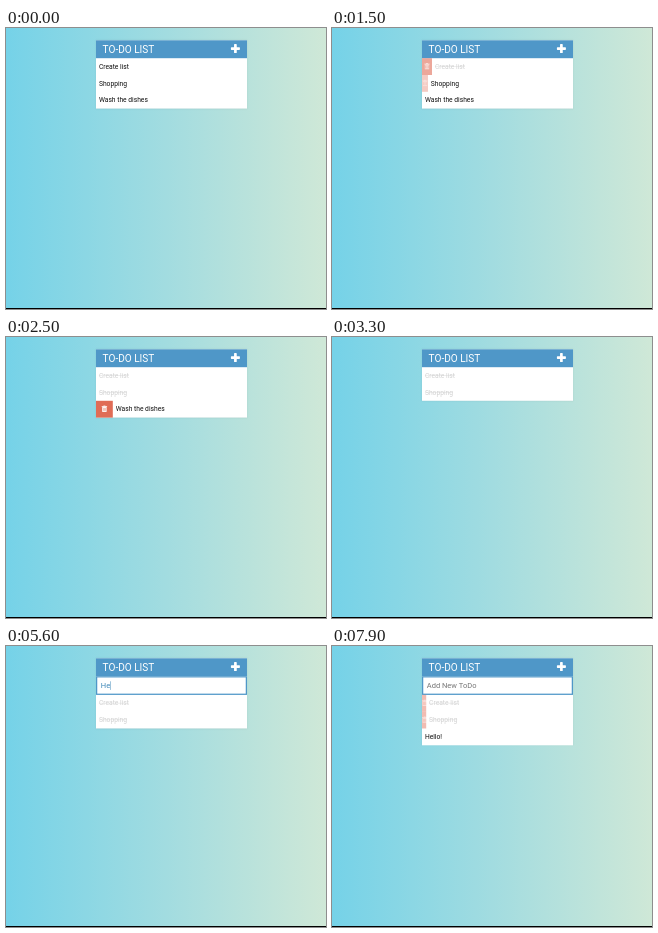
An HTML page with a canvas that plays this animation: 320x281 px, repeating every 8 s.

```html
<!DOCTYPE html>
<html lang="en">
<head>
<meta charset="utf-8">
<title>To-do list</title>
<style>
  html, body { margin: 0; width: 100%; height: 100%; overflow: hidden; background: #a2dce0; }
  canvas { display: block; width: 320px; height: 281px; }
</style>
</head>
<body>
<canvas id="stage"></canvas>
<script>
const W = 320, H = 281, LOOP = 8000;
const LEFT = 90, WIDTH = 151, TOP = 12.3, LIST_TOP = 30.2;
const ROW = 16.8, INPUT_H = 18.7;
const BLUE = '#4f97c8', RED = '#e06c56', BLACK = '#111', DONE = 210;

const canvas = document.getElementById('stage');
const ctx = canvas.getContext('2d');
const dpr = window.devicePixelRatio || 1;
canvas.width = W * dpr;
canvas.height = H * dpr;

// Key presses: [time, value of the field afterwards]
const keys = [[4700, ''], [5300, 'H'], [5600, 'He'], [5800, 'Hel'],
              [6000, 'Hell'], [6200, 'Hello'], [6800, 'Hello!'], [7000, '']];

const ramp = (t, from, to) => Math.min(1, Math.max(0, (t - from) / (to - from)));
const hover = (t, start, end) => ramp(t, start, start + 200) - ramp(t, end, end + 200);

function rect(x, y, w, h, color) {
  ctx.fillStyle = color;
  ctx.fillRect(x, y, w, h);
}

function text(str, x, y, size, color) {
  ctx.font = `400 ${size}px Roboto, sans-serif`;
  ctx.fillStyle = color;
  ctx.fillText(str, x, y);
}

function background() {
  const g = ctx.createLinearGradient(0, 0, W, 0);
  g.addColorStop(0, '#75d2e8');
  g.addColorStop(0.5, '#a2dce0');
  g.addColorStop(1, '#cfe8d7');
  rect(0, 0, W, H, g);
  rect(0, 280, W, 1, '#000');
}

function header() {
  rect(LEFT, TOP, WIDTH, LIST_TOP - TOP, BLUE);
  text('TO-DO LIST', 96.6, 24.8, 10.07, '#fff');
  ctx.fillStyle = '#fff';
  ctx.beginPath();
  ctx.roundRect(224.9, 19.2, 9, 2.7, 0.6);
  ctx.roundRect(228.05, 16.1, 2.7, 9, 0.6);
  ctx.fill();
}

function trash(x, y) {
  rect(x + 1.7, y, 2, 0.8, '#fff');
  rect(x, y + 0.6, 5.4, 0.9, '#fff');
  rect(x + 0.5, y + 1.5, 4.4, 4.8, '#fff');
  for (let i = 0; i < 3; i++) rect(x + 1.3 + i * 1.2, y + 2.4, 0.4, 2.9, RED);
}

function row(label, y, { open = 0, alpha = open, done = 0, fade = 1 }) {
  const w = ROW * open;
  if (open > 0) {
    ctx.globalAlpha = alpha * fade;
    rect(LEFT, y, w, ROW, RED);
    trash(LEFT + Math.max(0, (w - 5.4) / 2), y + 4.8);
  }
  ctx.globalAlpha = fade;
  const v = Math.round(17 + (DONE - 17) * done);
  const x = LEFT + w + 2.9, color = `rgb(${v},${v},${v})`;
  text(label, x, y + 10.5, 6.71, color);
  if (done) {
    ctx.globalAlpha = done * fade;
    rect(x, y + 8, ctx.measureText(label).width, 0.4, color);
  }
  ctx.globalAlpha = 1;
}

function input(t) {
  const key = keys.filter(k => t >= k[0]).pop();
  const y = LIST_TOP, value = key ? key[1] : '', x = 94.8;
  rect(LEFT, y, WIDTH, INPUT_H, key ? '#fff' : '#f8f8f8');
  if (key) {
    const b = 1.26;
    ctx.strokeStyle = BLUE;
    ctx.lineWidth = b;
    ctx.strokeRect(LEFT + b / 2, y + b / 2, WIDTH - b, INPUT_H - b);
  }
  text(value || 'Add New ToDo', x, 42.4, 7.5, value ? '#3f88b8' : '#757575');
  if (key && (t - key[0]) % 1000 < 500) {
    rect(x + (value ? ctx.measureText(value).width : 0), 35.3, 0.5, 8.6, '#3f88b8');
  }
}

function draw(t) {
  ctx.setTransform(dpr, 0, 0, dpr, 0, 0);
  background();

  const showInput = t >= 4000;
  const late = 0.25 * ramp(t, 7750, 7900);
  const first = late || hover(t, 560, 1420);
  const second = late || hover(t, 1430, 2150);
  const rows = [
    ['Create list', { open: first, alpha: late ? late * 1.8 : first, done: ramp(t, 850, 1050) }],
    ['Shopping', { open: second, alpha: late ? late * 1.8 : second, done: ramp(t, 1650, 1800) }]
  ];
  if (t < 3100) rows.push(['Wash the dishes', { open: hover(t, 2160, 9000), fade: 1 - ramp(t, 2820, 3100) }]);
  if (t >= 7000) rows.push(['Hello!', {}]);

  const listTop = LIST_TOP + (showInput ? INPUT_H : 0);
  ctx.save();
  ctx.shadowColor = 'rgba(0,0,0,0.1)';
  ctx.shadowBlur = 1.3 * dpr;
  rect(LEFT, TOP, WIDTH, listTop + rows.length * ROW - TOP, '#fff');
  ctx.restore();

  header();
  if (showInput) input(t);
  rows.forEach(([label, state], i) => row(label, listTop + i * ROW, state));
}

const start = performance.now();
function tick() {
  draw((performance.now() - start) % LOOP);
  requestAnimationFrame(tick);
}
tick();
</script>
</body>
</html>
```
